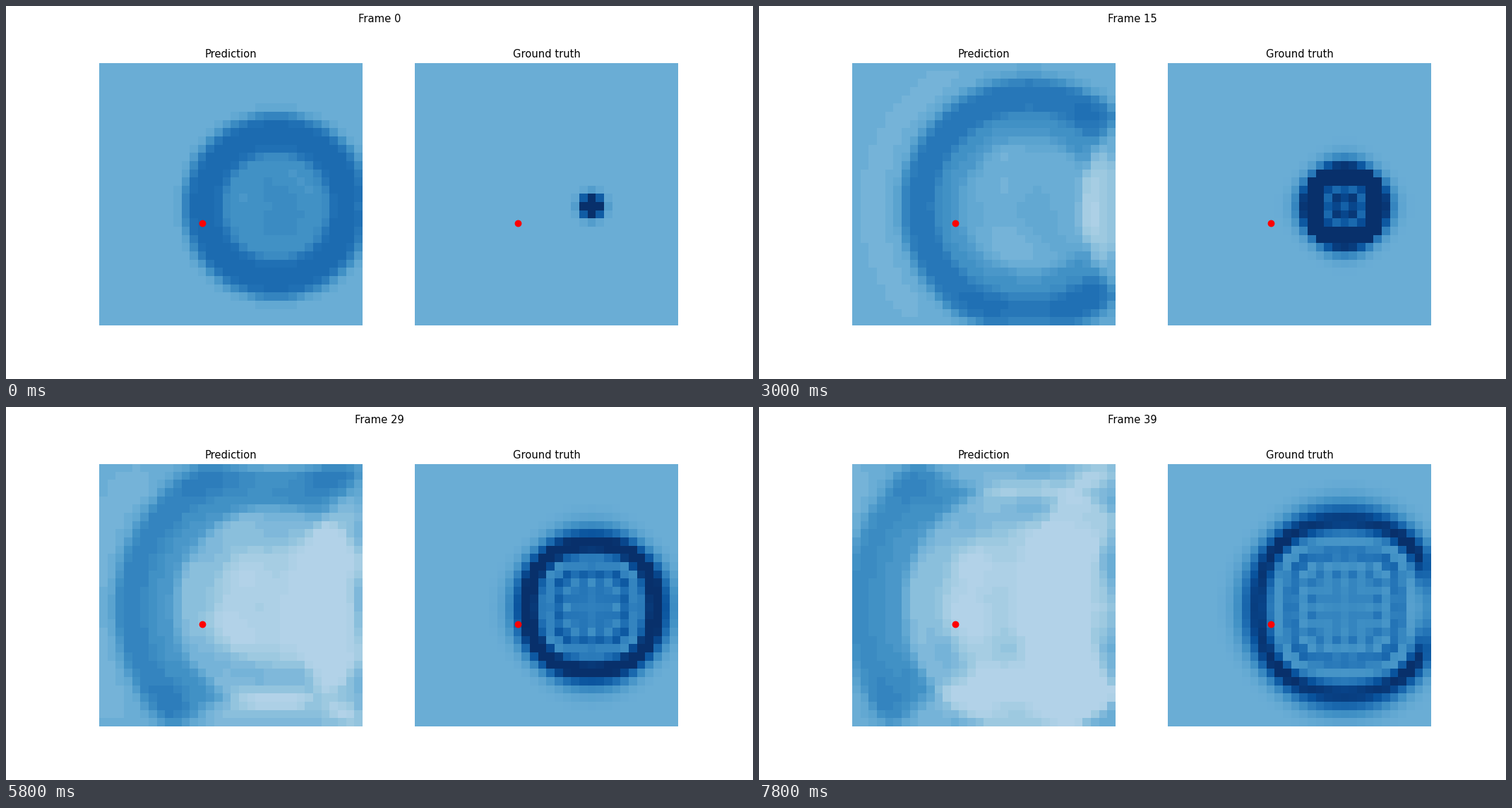
A matplotlib script that plays this animation: 1058 px wide and 529 px high, repeating every 8 s.

```python
import numpy as np
import matplotlib.pyplot as plt
from matplotlib.animation import FuncAnimation

SIZE = 32
FRAMES = 40
COL, ROW = 21, 17            # wave origin
PROBE = (12, 19)
COURANT = 0.3
SCALE = 0.44                 # wave height shown as the darkest blue
STEP = 0.025                 # tone step of the predicted field

rows, cols = np.mgrid[:SIZE, :SIZE]


def distance(cx, cy):
    return np.hypot(cols - cx, rows - cy)


def rise(x):
    """Smooth step from 0 to 1, halfway at x = 0."""
    return 1 / (1 + np.exp(-x))


def simulate():
    """Leapfrog wave equation with zero values outside the grid."""
    before = np.zeros((SIZE, SIZE))
    now = np.exp(-distance(COL, ROW) ** 2)
    fields = []
    for _ in range(FRAMES):
        pad = np.pad(now, 1)
        lap = (pad[2:, 1:-1] + pad[:-2, 1:-1]
               + pad[1:-1, 2:] + pad[1:-1, :-2] - 4 * now)
        before, now = now, 2 * now - before + COURANT ** 2 * lap
        fields.append(np.clip(0.5 + 0.5 * now / SCALE, 0, 1))
    return fields


def ring(s, k):
    """Height of the predicted wave at distance s outside its crest."""
    shoulder = 0.11
    inner = -0.07 + 0.21 * rise((13 - k) / 3)
    crest = 0.28 - 0.0034 * k - shoulder

    body = inner + (shoulder - inner) * rise(2.5 * (s + 4.6))
    body += crest * rise(2.5 * (s + 2 - 0.03 * k))
    hollow = 0.13 * rise((k - 21) / 2) * rise(-1.5 * (s + 9.5))
    halo = (0.01 + 0.0006 * k) * np.exp(-((s - 6) / 2.5) ** 2)
    return body * rise(2.5 * (2.7 - s)) - hollow - halo


def mottle(k):
    """Faint drifting unevenness."""
    rng = np.random.default_rng(4)
    total = np.zeros((SIZE, SIZE))
    for _ in range(6):
        a, b = rng.uniform(-1, 1, 2)
        phase = rng.uniform(0, 2 * np.pi)
        total += np.sin(a * cols + b * rows + phase + 0.1 * k)
    return 0.008 * total


def predict(k):
    """Expanding ring plus its inverted reflections at the walls."""
    crest = 8.5 + 0.29 * k
    field = mottle(k) * rise(2 * (crest - 4.5 - distance(COL, ROW)))
    for cx, sx in ((COL, 1), (2 * SIZE - COL, -1)):
        for cy, sy in ((ROW, 1), (2 * SIZE - ROW, -1), (-2 - ROW, -1)):
            field += sx * sy * ring(distance(cx, cy) - crest, k)
    return np.clip(0.5 + STEP * np.round(field / STEP), 0.31, 0.77)


truth = simulate()
prediction = [predict(k) for k in range(FRAMES)]

fig, axes = plt.subplots(1, 2, figsize=(12, 6), dpi=1058 / 12)
heading = fig.suptitle("Frame 0", fontsize=12)
images = []
for ax, name, fields in zip(axes, ("Prediction", "Ground truth"),
                            (prediction, truth)):
    images.append(ax.imshow(fields[0], cmap="Blues", vmin=0, vmax=1,
                            interpolation="nearest"))
    ax.plot(*PROBE, "ro", markersize=7)
    ax.set_title(name, fontsize=12)
    ax.set_axis_off()


def update(k):
    heading.set_text(f"Frame {k}")
    images[0].set_data(prediction[k])
    images[1].set_data(truth[k])
    return [heading, *images]


anim = FuncAnimation(fig, update, frames=FRAMES, interval=200,
                     repeat=True, repeat_delay=0, blit=False)
plt.show()
```
